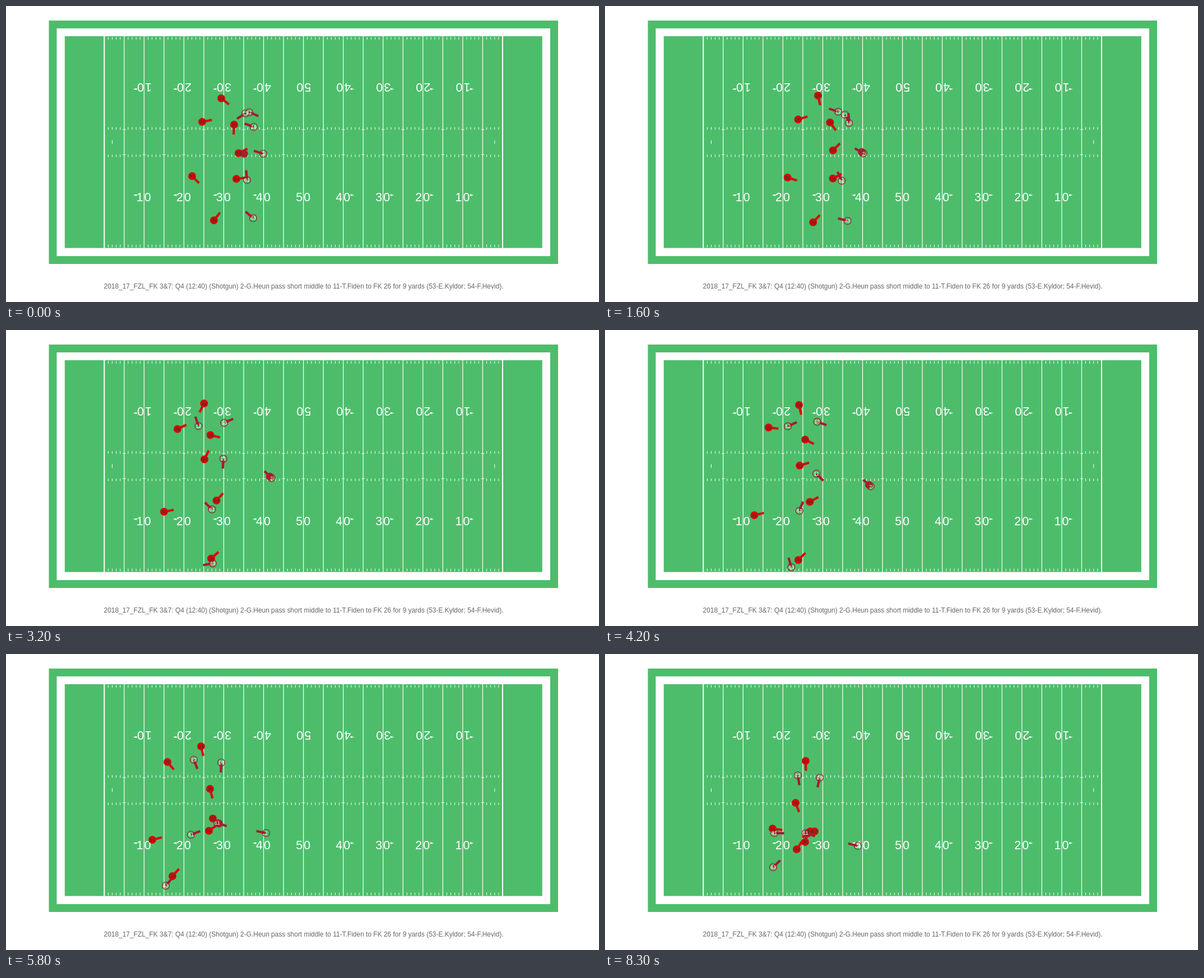
Animation, 1058 px wide and 529 px high, one loop 8400 ms. Source, as an HTML page:

```html
<!DOCTYPE html>
<html lang="en">
<head>
<meta charset="utf-8">
<title>Play tracking</title>
<style>
  html, body { margin: 0; width: 100%; height: 100%; overflow: hidden; background: #fff; }
  svg { display: block; width: 100vw; height: 100vh; font-family: "Liberation Sans", Arial, sans-serif; }
  .yards { font-size: 21.4px; letter-spacing: 2.1px; fill: #fff; }
  .jersey { font-size: 9px; text-anchor: middle; }
  .caption { font-size: 11.95px; fill: #666; }
</style>
</head>
<body>
<svg viewBox="0 0 1058 529">
  <rect x="76.5" y="26" width="908.5" height="435" fill="#4dbd6b"/>
  <rect x="90.5" y="40" width="880.5" height="407" fill="#fff"/>
  <rect x="104.8" y="54" width="852" height="378.5" fill="#4dbd6b"/>
  <path id="lines" stroke="#fff" stroke-width="1.2"/>
  <path id="goals" stroke="#fff" stroke-width="2"/>
  <g id="half"></g>
  <use href="#half" transform="rotate(180 530.65 243.25)"/>
  <g id="bars" stroke-width="4.2"></g>
  <g id="discs"></g>
  <circle id="ball" r="6.9" fill="#a8202e"/>
  <g id="rings" fill="none" stroke-width="1.2"></g>
  <g id="jerseys"></g>
  <text class="caption" x="174.5" y="505">2018_17_FZL_FK 3&amp;7: Q4 (12:40) (Shotgun) 2-G.Heun pass short middle to 11-T.Fiden to FK 26 for 9 yards (53-E.Kyldor; 54-F.Hevid).</text>
</svg>
<script>
const LOOP = 8400, STEP = 100, BAR = 17.6;
const RED = '#d50a0a', MAROON = '#a71930';
const byId = id => document.getElementById(id);
const yardX = yard => 175.3 + 7.107 * yard;

function set(node, attrs) {
  for (const key in attrs) node.setAttribute(key, attrs[key]);
}
function add(parent, tag, attrs, text = '') {
  const node = document.createElementNS('http://www.w3.org/2000/svg', tag);
  set(node, attrs);
  node.textContent = text;
  return byId(parent).appendChild(node);
}

// Field: one half of the symmetric markings, mirrored by <use>
const yardLine = yard => `M${yardX(yard)} 54V432.5`;
let lines = '', ticks = `M${yardX(2)} 240V246.5`;
for (let yard = 1; yard < 100; yard++) {
  const x = yardX(yard);
  if (yard % 5) {
    ticks += `M${x} 55.5V60M${x} 216.5V221`;
  } else {
    lines += yardLine(yard);
    ticks += `M${x - 2.8} 220.8H${x + 2.8}`;
  }
}
set(byId('lines'), { d: lines });
set(byId('goals'), { d: yardLine(0) + yardLine(100) });
add('half', 'path', { d: ticks, stroke: '#fff' });
for (let yard = 10; yard < 100; yard += 10) {
  const x = yardX(yard), side = Math.sign(yard - 50);
  add('half', 'text', { class: 'yards', x: x - 13.5, y: 348.7 }, 50 - Math.abs(yard - 50));
  if (side) {
    add('half', 'path', { d: `M${x + side * 13} 336.2v3.6L${x + side * 19.7} 338z`, fill: '#fff' });
  }
}

// Moments of the play: snap, break of the routes, tackle, end
const MOMENTS = [1000, 3600, 5800, 8300];
const LAST = MOMENTS.length - 1;

const mix = (a, b, s) => a + (b - a) * s;
const progress = (t, from, to) => Math.min(1, Math.max(0, (t - from) / (to - from)));
const smooth = s => s * s * (3 - 2 * s);
const turn = (a, b, s) => a + (((b - a) % 360 + 540) % 360 - 180) * s;

// Curve through the key points, starting from rest
function along(path, axis, t) {
  const slope = k => {
    if (!k) return 0;
    const next = Math.min(k + 1, LAST);
    return (path[next][axis] - path[k - 1][axis]) / (MOMENTS[next] - MOMENTS[k - 1]);
  };
  const i = Math.max(0, MOMENTS.findLastIndex((m, k) => m <= t && k < LAST));
  const s = progress(t, MOMENTS[i], MOMENTS[i + 1]), r = 1 - s;
  return mix(path[i][axis], path[i + 1][axis], smooth(s))
    + (MOMENTS[i + 1] - MOMENTS[i]) * s * r * (slope(i) * r - slope(i + 1) * s);
}
const place = (player, t) => [along(player.path, 0, t), along(player.path, 1, t)];

const players = [];
function player(team, number, lineUp, route, path) {
  const disc = team === RED;
  const result = {
    lineUp, route, path,
    bar: add('bars', 'line', { stroke: team }),
    mark: disc ? add('discs', 'circle', { r: 7, fill: team })
               : add('rings', 'circle', { r: 6.5, stroke: team }),
    label: add('jerseys', 'text', { class: 'jersey', fill: disc ? '#34302b' : '#fff' }, number)
  };
  players.push(result);
  return result;
}

// Team, number, heading at line-up and on the route, key points
player(RED, 24, 38, 117, [[384, 165], [349, 129], [348, 165], [358, 191]]);
player(RED, 26, -11, -25, [[350, 207], [299, 174], [288, 193], [340, 266]]);
player(RED, 35, 93, 14, [[407, 212], [359, 188], [364, 241], [357, 336]]);
player(RED, 54, -8, -48, [[411, 309], [370, 305], [362, 316], [366, 317]]);
player(RED, 53, -27, -64, [[415, 263], [347, 231], [369, 294], [374, 317]]);
player(RED, 31, 45, -11, [[332, 304], [274, 328], [261, 332], [299, 312]]);
player(RED, 29, -52, -42, [[371, 383], [361, 411], [297, 397], [342, 349]]);
player(MAROON, 12, 147, -109, [[427, 192], [332, 170], [335, 189], [344, 217]]);
const receiver = player(MAROON, 11, 22, 93, [[434, 190], [381, 240], [377, 302], [358, 320]]);
player(MAROON, 18, 200, -24, [[442, 216], [382, 161], [384, 194], [383, 221]]);
const passer = player(MAROON, 2, 197, 224, [[459, 264], [475, 268], [464, 320], [451, 343]]);
player(MAROON, 81, -95, -136, [[430, 311], [357, 322], [330, 323], [302, 320]]);
player(MAROON, 43, 220, 170, [[441, 379], [354, 422], [285, 414], [300, 381]]);

// The ball is snapped, held by the passer, thrown and carried
function ballAt(t) {
  const spot = [425, 264];
  const [px, py] = place(passer, t), [rx, ry] = place(receiver, t);
  const snap = progress(t, 900, 1500), pass = progress(t, 4500, 5100);
  const held = [px - 3, py - 2.5], caught = [rx + 3, ry + 1];
  return spot.map((from, axis) => mix(mix(from, held[axis], snap), caught[axis], pass));
}

function draw(t) {
  const [bx, by] = ballAt(t);
  set(byId('ball'), { cx: bx, cy: by });
  for (const p of players) {
    const [x, y] = place(p, t);
    const toBall = Math.atan2(by - y, bx - x) * 180 / Math.PI;
    const running = turn(p.lineUp, p.route, progress(t, 0, 3200));
    const heading = turn(running, toBall, smooth(progress(t, 3200, 5000))) * Math.PI / 180;
    set(p.bar, { x1: x, y1: y, x2: x + BAR * Math.cos(heading), y2: y + BAR * Math.sin(heading) });
    set(p.mark, { cx: x, cy: y });
    set(p.label, { x, y: y + 3.3 });
  }
}

const start = performance.now();
function tick() {
  const elapsed = (performance.now() - start) % LOOP;
  draw(Math.floor(elapsed / STEP) * STEP);
  requestAnimationFrame(tick);
}
tick();
</script>
</body>
</html>
```
